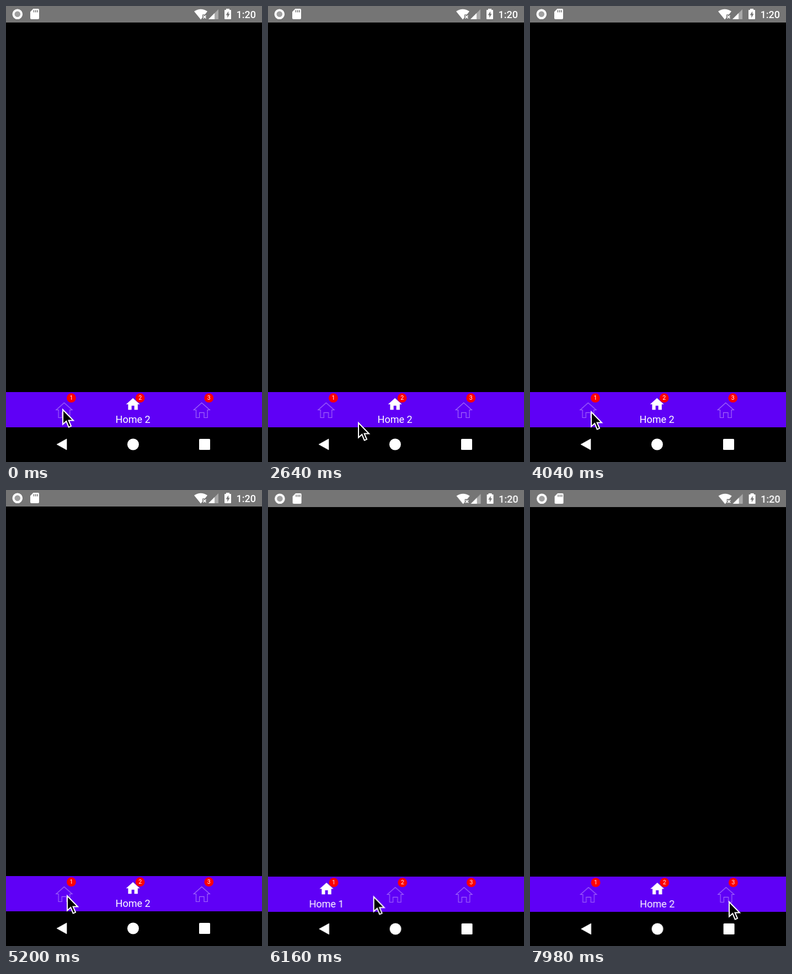
These frames come from a looping animation (464 px wide and 828 px high, 8000 ms). An HTML page:

```html
<!DOCTYPE html>
<html lang="en">
<head>
<meta charset="utf-8">
<title>Bottom tabs with badges</title>
<style>
  html, body { margin: 0; width: 100%; height: 100%; overflow: hidden; background: #000; }
  svg { display: block; width: 100%; height: 100%; }
  text { font-family: Roboto, sans-serif; fill: #fff; text-anchor: middle; }
  .white { fill: #fff; }
  .status { fill: #757575; }
  .bar { fill: #5f00f6; }
  .label { font-size: 18px; }
  .clock { font-size: 18px; font-weight: 500; }
  .badge circle { fill: #f00; }
  .badge text { font-size: 10.5px; }
  .outline { fill: none; stroke: #a368fa; stroke-width: 1.2; }
  .ripple { fill: #4e00fa; opacity: 0; }

  .screen, .cursor, .ripple, .on, .off { animation: 8s linear infinite; }
  .screen { animation-name: nudge; }
  .cursor { animation-name: wander; }
  .first .ripple { animation-name: ripple1; }
  .second .ripple { animation-name: ripple2; }
  .first .on { animation-name: show; }
  .first .off { animation-name: hide; }
  .second .on { animation-name: hide; }
  .second .off { animation-name: show; }
  .third .on { display: none; }

  @keyframes nudge {
    0%, 66.24% { transform: none; }
    66.25%, 100% { transform: translate(.6px, 1px); }
  }
  @keyframes show {
    0%, 66.6% { opacity: 0; }
    68.1%, 89.9% { opacity: 1; }
    91.4%, 100% { opacity: 0; }
  }
  @keyframes hide {
    0%, 66.6% { opacity: 1; }
    68.1%, 89.9% { opacity: 0; }
    91.4%, 100% { opacity: 1; }
  }
  @keyframes ripple1 {
    0%, 65.4% { opacity: 0; transform: scale(.3); }
    66% { opacity: 1; }
    68.2% { transform: scale(1); }
    71% { opacity: 1; }
    73%, 100% { opacity: 0; transform: scale(1); }
  }
  @keyframes ripple2 {
    0%, 88.7% { opacity: 0; transform: scale(.3); }
    89.3% { opacity: 1; }
    91.5% { transform: scale(1); }
    94.2% { opacity: 1; }
    96.2%, 100% { opacity: 0; transform: scale(1); }
  }
  @keyframes wander {
    0%, 1% { transform: translate(102px, 731px); }
    14%, 20.5% { transform: translate(205px, 774px); }
    33% { transform: translate(163px, 755px); }
    50.5%, 67% { transform: translate(110px, 735px); }
    70.25%, 71.5% { transform: translate(150px, 734px); }
    84%, 90.5% { transform: translate(242px, 740px); }
    98.5%, 100% { transform: translate(360px, 746px); }
  }
</style>
</head>
<body>
<svg viewBox="0 0 464 828">
  <defs>
    <clipPath id="barClip"><rect x="-2" y="701" width="470" height="64"/></clipPath>
    <path id="solid" d="M-2.5 21.3v-7.5h5v7.5h6.2v-10h3.8L0 0-12.5 11.3h3.8v10z"/>
    <path id="house" d="M0 .5-14.5 13.5h4.2v14h6.1v-9.2h8.4v9.2h6.1v-14h4.2z"/>
  </defs>

  <g class="screen">
    <rect class="status" x="-2" y="-2" width="470" height="32"/>
    <circle cx="20.8" cy="14.8" r="7.3" fill="#a0a0a0" stroke="#fff" stroke-width="4"/>
    <path class="white" d="M49.5 5H58q2 0 2 2V22q0 2-2 2H46q-2 0-2-2V10.5z"/>
    <path d="M50.5 7.5v4M53.8 7.5v4M57 7.5v4" stroke="#757575" stroke-width="1.6"/>
    <path class="white" d="M341 9.8Q353 1.8 365 9.8L360.5 15.5H356V21L353 24.5z"/>
    <path d="M357.5 17.3l5 5m0-5l-5 5" stroke="#fff" stroke-width="1.7"/>
    <path d="M385 6V24H367z" fill="#a8a8a8"/>
    <path class="white" d="M378 13V24H367z"/>
    <path class="white" d="M399 7V5h6v2h2q1 0 1 1V23q0 1-1 1H397q-1 0-1-1V8q0-1 1-1z"/>
    <path class="status" d="M403.2 9.5 398.7 16.5h2.6V21.5l4.2-7.3h-2.3z"/>
    <text class="clock" x="435.3" y="21.5">1:20</text>

    <rect class="bar" x="-2" y="701" width="470" height="64"/>
    <g id="tabs" clip-path="url(#barClip)"></g>

    <path class="white" d="M92 796 110 786V806z" stroke="#fff" stroke-width=".6" stroke-linejoin="round"/>
    <circle class="white" cx="230.4" cy="796" r="10.5"/>
    <rect class="white" x="350" y="786" width="20" height="20" rx="1.5"/>
  </g>

  <path class="cursor" d="M1 2V28.5L7.3 23 11.7 33.6 16 31.8 11.6 21.6H20z"
        fill="#000" stroke="#fff" stroke-width="2"/>
</svg>
<script>
  const tab = (name, i) => `
    <g class="${name}" transform="translate(${105.4 + 124.7 * i} 0)">
      <g transform="translate(0 733)"><circle class="ripple" r="58.5"/></g>
      <use class="off outline" href="#house" y="720"/>
      <g class="on">
        <use class="white" href="#solid" y="712"/>
        <text class="label" x="0" y="757">Home ${i + 1}</text>
      </g>
      <g class="badge">
        <circle cx="13" cy="711.7" r="8.4"/>
        <text x="13" y="715.4">${i + 1}</text>
      </g>
    </g>`;
  document.getElementById('tabs').innerHTML = ['first', 'second', 'third'].map(tab).join('');
</script>
</body>
</html>
```
